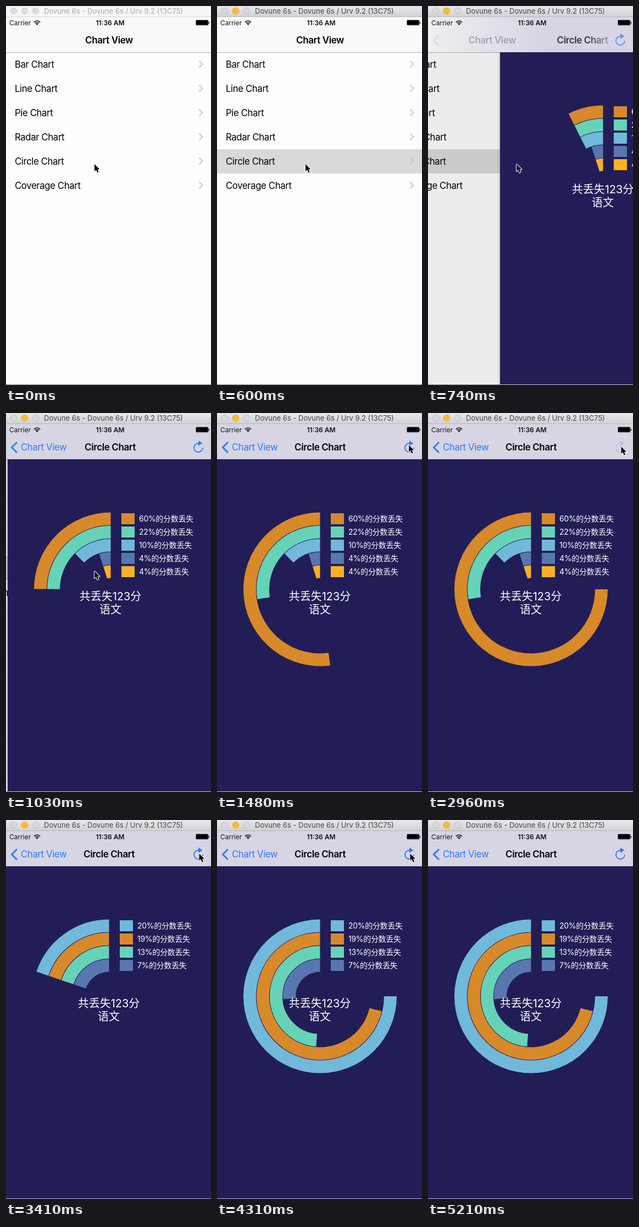
Recreate the animation shown at these times as an HTML page with a canvas. Size 373 by 688 pixels, loop 6.08 s.

```html
<!DOCTYPE html>
<html lang="zh-Hans">
<head>
<meta charset="utf-8">
<title>Chart View</title>
<style>
html, body { margin: 0; width: 100%; height: 100%; overflow: hidden; background: #fff; }
canvas { display: block; }
</style>
</head>
<body>
<canvas id="stage" width="373" height="688"></canvas>
<script>
const ctx = document.getElementById('stage').getContext('2d');
const W = 373, H = 688, NAV = 84, LOOP = 6080;
const LATIN = 'Inter, "Noto Sans CJK SC", "Noto Sans CJK", sans-serif';
const BLUE = '#2f7bf6', NAVY = '#221d56';
const ORANGE = '#d8892a', TEAL = '#66d3b7', SKY = '#71b9da', SLATE = '#5877b0', GOLD = '#fbb024';

// The screen refreshes at these moments only.
const TICKS = [0, 450, 600, 740, 890, 1030, 1180, 1330, 1480, 1630, 1770, 1920, 2070, 2960,
  3110, 3260, 3410, 3560, 3710, 3860, 4010, 4160, 4310, 5060, 5210];

const ROWS = ['Bar Chart', 'Line Chart', 'Pie Chart', 'Radar Chart', 'Circle Chart', 'Coverage Chart'];
const CHARTS = [
  { start: 617, speed: 0.2174, parts: [[60, ORANGE], [22, TEAL], [10, SKY], [4, SLATE], [4, GOLD]] },
  { start: 3093, speed: 0.225, parts: [[20, SKY], [19, ORANGE], [13, TEAL], [7, SLATE]] }
];
const POINTER = [[0, 161, 287], [1330, 244, 147], [1480, 349, 58], [1630, 351, 55], [1770, 353, 55],
  [1920, 352, 61], [2070, 351.5, 61], [5060, 313, 94]];
const POINTER_END = 5210;

const clamp = v => Math.max(0, Math.min(1, v));

function rect(x, y, w, h, fill) {
  ctx.fillStyle = fill;
  ctx.fillRect(x, y, w, h);
}

function text(str, x, y, font, fill, { align = 'left', track = 0, alpha = 1 } = {}) {
  ctx.globalAlpha = alpha;
  ctx.font = font + ' ' + LATIN;
  ctx.letterSpacing = track + 'px';
  ctx.textAlign = align;
  ctx.fillStyle = fill;
  ctx.fillText(str, x, y);
  ctx.globalAlpha = 1;
}

function line(points, color, width) {
  ctx.beginPath();
  for (const [x, y] of points) ctx.lineTo(x, y);
  ctx.strokeStyle = color;
  ctx.lineWidth = width;
  ctx.stroke();
}

function arc(x, y, r, from, to, color, width) {
  ctx.beginPath();
  ctx.arc(x, y, r, from, to);
  ctx.strokeStyle = color;
  ctx.lineWidth = width;
  ctx.stroke();
}

function shape(points, fill) {
  ctx.beginPath();
  for (const [x, y] of points) ctx.lineTo(x, y);
  ctx.closePath();
  ctx.fillStyle = fill;
  ctx.fill();
}

function gradient(x0, y0, x1, y1, ...colors) {
  const g = ctx.createLinearGradient(x0, y0, x1, y1);
  colors.forEach((c, i) => g.addColorStop(i / (colors.length - 1), c));
  return g;
}

function drawList(t, push) {
  ctx.save();
  ctx.translate(-112 * push, 0);
  rect(0, NAV, W + 112, H - NAV, '#fefefe');
  if (t >= 600) rect(0, 260, W + 112, 44, '#d9d9d9');
  ROWS.forEach((name, i) => {
    const y = 106 + 44 * i;
    text(name, 16, y + 5.5, '16.8px', '#000', { track: -0.4 });
    line([[351.5, y - 6.5], [357.5, y - 0.5], [351.5, y + 5.5]], '#c7c7cc', 1.8);
  });
  ctx.restore();
  rect(0, NAV, W, H - NAV, `rgba(0,0,0,${0.1 * push})`);
  rect(0, 687, W, 1, '#777');
}

function drawChart(t) {
  const { start, speed, parts } = CHARTS[t < 3110 ? 0 : 1];
  const sweep = Math.max(0, t - start) * speed;
  parts.forEach(([pct, color], i) => {
    const deg = Math.min(sweep, 270 * pct / parts[0][0]);
    const top = -Math.PI / 2;
    arc(187.5, 320, 128 - 24 * i, top - deg * Math.PI / 180, top, color, 23);
    rect(207, 182 + 24 * i, 24, 20, color);
    text(pct + '%的分数丢失', 239, 197 + 24 * i, '14px', '#fff', { track: -0.3 });
  });
  text('共丢失123分', 187, 340, '20px', '#fff', { align: 'center' });
  text('语文', 187, 364, '20px', '#fff', { align: 'center' });
}

function drawPage(t, offset) {
  rect(offset - 6, NAV, 6, H - NAV, gradient(offset - 6, 0, offset, 0, 'rgba(0,0,0,0)', 'rgba(0,0,0,.1)'));
  ctx.save();
  ctx.translate(offset, 0);
  rect(0, NAV, W, H - NAV, NAVY);
  rect(0, 687, W, 1, '#c9c8d2');
  drawChart(t);
  ctx.restore();
}

function drawRefresh(alpha) {
  ctx.globalAlpha = alpha;
  arc(350, 63, 8, 0, Math.PI * 1.5, BLUE, 1.9);
  shape([[350, 50], [357.5, 55], [350, 59.5]], BLUE);
  ctx.globalAlpha = 1;
}

function drawNav(t, left) {
  const push = 1 - left, offset = W * left;
  const title = { align: 'center', track: -0.4 };
  rect(0, 20, W, 64, '#f9f9f9');
  if (!push) {
    text('Chart View', 187.5, 68, '600 17px', '#000', title);
    return;
  }
  rect(0, 20, W, 64, gradient(0, 0, Math.max(1, offset * 1.6), 0, left > 0.01 ? '#efeff1' : '#d7d5e4', '#d7d5e4'));

  text('Chart View', 187.5 - 109 * push, 68, '600 17px', '#000', { ...title, alpha: clamp(left * 0.9 - 0.05) });
  const back = clamp(1 - left / 0.3);
  text('Chart View', 27, 68, '16.8px', BLUE, { track: -0.4, alpha: back });
  ctx.globalAlpha = Math.max(0.08, back);
  line([[20, 53], [10.5, 62.5], [20, 72]], back ? BLUE : '#000', 3);
  ctx.globalAlpha = 1;

  const ink = left > 0.01 ? gradient(290, 0, 335, 0, '#000', 'rgba(0,0,0,.25)') : '#000';
  text('Circle Chart', 187.5 + 267 * left, 68, '600 17px', ink, { ...title, alpha: 1 - left * 0.7 });
  const pressed = t >= 2960 ? clamp(0.2 + Math.max(0, t - 3110) / 375) : 1;
  drawRefresh(Math.min(pressed, 1 - left * 0.7));
}

function drawBattery() {
  ctx.beginPath();
  ctx.roundRect(345.5, 25.5, 22.5, 9.5, 2);
  ctx.strokeStyle = 'rgba(0,0,0,.5)';
  ctx.lineWidth = 1;
  ctx.stroke();
  rect(346, 26, 21.5, 8.5, '#000');
  rect(368.5, 28.5, 1.3, 4, '#000');
}

function drawStatus() {
  text('Carrier', 6, 34.5, '12px', '#111');
  text('11:36 AM', 189.5, 34.5, '600 12px', '#111', { align: 'center' });
  for (const r of [8, 5]) arc(56.5, 35, r, -Math.PI * 0.75, -Math.PI * 0.25, '#111', 1.7);
  shape([[56.5, 35], [54.3, 32.4], [56.5, 31.6], [58.7, 32.4]], '#111');
  drawBattery();
}

function drawTitleBar(active) {
  rect(0, 0, W, 20, active ? gradient(0, 0, 0, 20, '#e8e7e9', '#d1d0d2') : '#f6f6f6');
  rect(0, 19, W, 1, active ? '#b8b7ba' : '#d8d8d8');
  [14, 34, 54].forEach((x, i) => {
    const lit = active && i === 1;
    ctx.beginPath();
    ctx.arc(x, 9, 5.8, 0, Math.PI * 2);
    ctx.fillStyle = lit ? '#fbbd2e' : active ? '#d9d8da' : '#dcdcdc';
    ctx.fill();
    ctx.strokeStyle = lit ? '#dfa023' : active ? '#b9b8ba' : '#d0d0d0';
    ctx.lineWidth = 0.8;
    ctx.stroke();
  });
  text('Dovune 6s - Dovune 6s / Urv 9.2 (13C75)', 69, 14, '13px', active ? '#444' : '#a9a9a9');
}

function drawPointer(t) {
  if (t >= POINTER_END) return;
  const [, x, y] = POINTER.findLast(p => p[0] <= t);
  const outline = [[0, 0], [0, 13], [3, 10.3], [5.2, 15.5], [7.6, 14.5], [5.4, 9.4], [9.4, 9.4]];
  ctx.save();
  ctx.translate(x, y);
  ctx.lineJoin = 'round';
  line([...outline, outline[0]], '#fff', 2);
  shape(outline, '#000');
  ctx.restore();
}

function draw(time) {
  const t = TICKS.findLast(tick => tick <= time % LOOP);
  let left = t < 660 ? 1 : Math.exp(-0.0131 * (t - 660));
  if (t >= 1180) left = 0;
  if (left > 0) drawList(t, 1 - left);
  if (left < 1) drawPage(t, Math.round(W * left));
  drawNav(t, left);
  rect(0, NAV, W, 1, 'rgba(0,0,0,.3)');
  drawStatus();
  drawTitleBar(t >= 450);
  drawPointer(t);
}

const begin = performance.now();
function loop() {
  draw(performance.now() - begin);
  requestAnimationFrame(loop);
}
loop();
</script>
</body>
</html>
```
